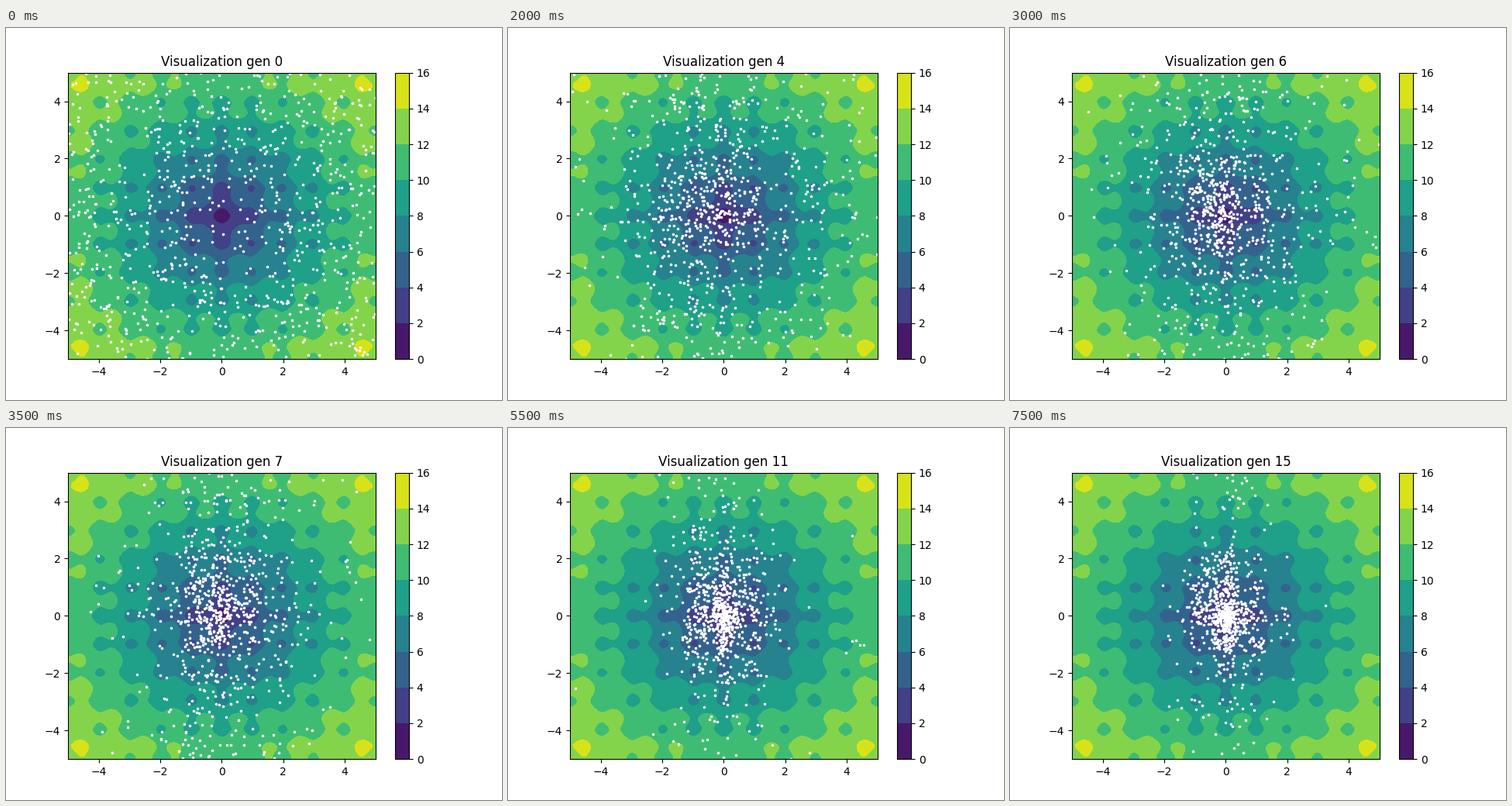
These frames come from a looping animation (640 by 480 pixels, 8 s). A matplotlib script:

```python
import matplotlib.pyplot as plt
import numpy as np
from matplotlib.animation import FuncAnimation

GENERATIONS = 16
POPULATION = 820
BOUND = 5


def ackley(x, y):
    bowl = -20 * np.exp(-0.2 * np.sqrt(0.5 * (x**2 + y**2)))
    ripple = -np.exp(0.5 * (np.cos(2 * np.pi * x) + np.cos(2 * np.pi * y)))
    return bowl + ripple + np.e + 20


def cost(points):
    return ackley(points[:, 0], points[:, 1])


def pressure(gen):
    """Total selection pressure built up by a generation."""
    return 0.56 * (gen / (GENERATIONS - 1)) ** 0.75


def accept(rng, points, trial, k):
    """Keep trial points that pass a Metropolis test and stay in bounds."""
    gain = np.exp(np.minimum(0, k * (cost(points) - cost(trial))))
    ok = (rng.random(len(points)) < gain) & (np.abs(trial) < BOUND).all(axis=1)
    return np.where(ok[:, None], trial, points)


def next_generation(rng, points, gen):
    k = pressure(gen)
    weight = np.exp(-(k - pressure(gen - 1)) * cost(points))
    points = points[rng.choice(len(points), len(points), p=weight / weight.sum())]

    # crossover: half of the points take the x of a random partner
    trial = points.copy()
    mates = rng.random(len(points)) < 0.5
    trial[mates, 0] = rng.permutation(points[:, 0])[mates]
    points = accept(rng, points, trial, k)

    # mutation
    return accept(rng, points, points + rng.normal(0, 0.35, points.shape), k)


def evolve():
    rng = np.random.default_rng(7)
    history = [rng.uniform(-BOUND, BOUND, (POPULATION, 2))]
    for gen in range(1, GENERATIONS):
        history.append(next_generation(rng, history[-1], gen))
    return history


history = evolve()

fig, ax = plt.subplots(figsize=(6.4, 4.8), dpi=100)
axis = np.linspace(-BOUND, BOUND, 100)
X, Y = np.meshgrid(axis, axis)
field = ax.contourf(X, Y, ackley(X, Y), levels=np.arange(0, 17, 2))
fig.colorbar(field)
dots = ax.scatter(*history[0].T, s=10, marker=".", color="white")
title = ax.set_title("Visualization gen 0")
ax.set(xlim=(-BOUND, BOUND), ylim=(-BOUND, BOUND))


def update(gen):
    dots.set_offsets(history[gen])
    title.set_text(f"Visualization gen {gen}")
    return dots, title


anim = FuncAnimation(fig, update, frames=GENERATIONS, interval=500,
                     repeat=True, repeat_delay=0, blit=False)
plt.show()
```
